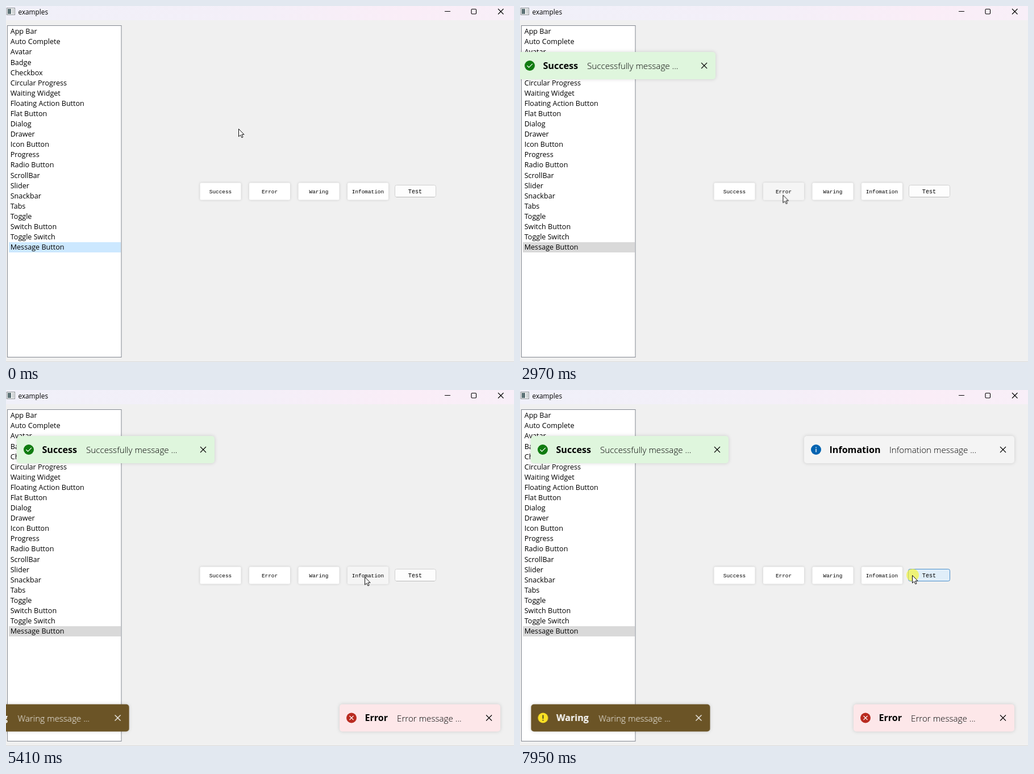
Recreate the animation shown at these times as an HTML page. Size 894 by 627 pixels, loop 7990 ms.

```html
<!DOCTYPE html>
<html lang="en">
<head>
<meta charset="utf-8">
<title>examples</title>
<style>
  html, body { margin: 0; width: 100%; height: 100%; overflow: hidden; background: #f0f0f0; }
  svg { display: block; width: 894px; height: 627px; }
  text { font-family: "Open Sans", "Noto Sans", sans-serif; font-size: 12.6px; fill: #000; }
  .caption { font-size: 11.8px; }
  .label { font: 9.4px "Liberation Mono", monospace; text-anchor: middle; }
  .label.large { font-size: 10.2px; }
  .title { font-size: 16.1px; font-weight: 700; }
  .message { font-size: 15.2px; font-weight: 300; }
  .line { fill: none; stroke: #000; stroke-width: 1.1; }
  .soft { filter: drop-shadow(0 0 2px rgba(0, 0, 0, .17)); }
  .raised { filter: drop-shadow(0 0 3px rgba(0, 0, 0, .15)); }
</style>
</head>
<body>
<svg id="stage" viewBox="0 0 894 627">
  <defs>
    <linearGradient id="bar">
      <stop offset="0" stop-color="#f0f0f9"/>
      <stop offset=".5" stop-color="#f4eff8"/>
      <stop offset=".8" stop-color="#faedf7"/>
      <stop offset="1" stop-color="#f8eff8"/>
    </linearGradient>
  </defs>
  <rect width="894" height="627" fill="#f0f0f0"/>
  <rect width="894" height="25" fill="url(#bar)"/>
  <path d="M0 626.5H894" stroke="#dadada"/>
  <rect x="1.5" y="3.5" width="14" height="12" fill="#f8f8f8" stroke="#8b9094"/>
  <rect x="3" y="5" width="6" height="9" fill="#5c7276"/>
  <rect x="11" y="5" width="3" height="9" fill="#c9ced0"/>
  <text class="caption" x="21.5" y="14.5">examples</text>
  <path class="line" d="M772 9.5H782M866 5L875.5 14.5M875.5 5L866 14.5"/>
  <rect class="line" x="819" y="5.5" width="8.5" height="8.5" rx="1.5"/>
  <rect x="2.5" y="34.5" width="200.5" height="584" fill="#fff" stroke="#828790"/>
  <g id="list"></g>
  <g id="buttons"></g>
  <g id="toasts"></g>
  <g id="cursor">
    <circle id="press" cx="1" cy="0" r="11" fill="#f4f433" fill-opacity=".66"/>
    <path d="M.5 .5V14L3.7 11.1L5.9 15.8L8 14.9L5.9 10.3H10Z" fill="#fff" stroke="#000" stroke-width=".95"/>
  </g>
</svg>
<script>
const LOOP = 7990;
const byId = id => document.getElementById(id);
const css = [];

// stops: [ms, declarations] pairs
function track(id, stops, timing = 'linear') {
  const body = stops.map(([ms, rule]) => `${(ms / LOOP * 100).toFixed(3)}%{${rule}}`).join('');
  css.push(`@keyframes ${id}{${body}}`, `#${id}{animation:${id} ${LOOP}ms ${timing} infinite}`);
}

// visible only within the given [start, end] ranges
function show(id, ...ranges) {
  const stops = ranges.flatMap(([from, to]) => [[from, 'opacity:1'], [to, 'opacity:0']]);
  track(id, [[0, 'opacity:0'], ...stops], 'step-end');
}

const items = ['App Bar', 'Auto Complete', 'Avatar', 'Badge', 'Checkbox', 'Circular Progress',
  'Waiting Widget', 'Floating Action Button', 'Flat Button', 'Dialog', 'Drawer', 'Icon Button',
  'Progress', 'Radio Button', 'ScrollBar', 'Slider', 'Snackbar', 'Tabs', 'Toggle',
  'Switch Button', 'Toggle Switch', 'Message Button'];
byId('list').innerHTML =
  '<rect x="5" y="416" width="197" height="18" fill="#cce8ff"/>' +
  '<rect id="blurred" x="5" y="416" width="197" height="18" fill="#d9d9d9"/>' +
  items.map((name, i) => `<text x="7.7" y="${(49.2 + i * 18.095).toFixed(1)}">${name}</text>`).join('');
show('blurred', [1780, LOOP]);

const buttons = [
  ['Success', 700, 1970], ['Error', 2030, 3695], ['Waring', 3800, 5008], ['Infomation', 5090, 6920]
];
byId('buttons').innerHTML = buttons.map(([name, from, to], i) => {
  const x = 341.5 + i * 86.5;
  const box = `x="${x}" y="311.5" width="72" height="30" rx="2.5"`;
  show('hover' + name, [from, to]);
  return `<rect class="soft" ${box} fill="#fff"/><rect id="hover${name}" ${box} fill="#f5f5f5"/>
    <text class="label" x="${x + 36}" y="330.3">${name}</text>`;
}).join('') + `
  <rect x="684.5" y="315.5" width="72" height="21" rx="3" fill="#fdfdfd" stroke="#d0d0d0"/>
  <path d="M687 336.5H754" stroke="#b9b9b9"/>
  <rect id="hoverTest" x="683.5" y="315.5" width="73" height="21" rx="3" fill="#e0eef9" stroke="#4a8fcb"/>
  <text class="label large" x="720" y="330.3">Test</text>`;
show('hoverTest', [7220, LOOP]);

const icons = {
  check: '<path d="M-4.5 0L-1.5 3.2L4.8 -3.2" fill="none" stroke="#fff" stroke-width="1.2"/>',
  cross: '<path d="M-3.5 -3.5L3.5 3.5M3.5 -3.5L-3.5 3.5" stroke="#fff" stroke-width="1.1"/>',
  alert: '<path d="M0 -5V1.6M0 3.2V5" stroke="#222" stroke-width="1.6"/>',
  info: '<path d="M0 -4.6V-3M0 -1.5V4.6" stroke="#fff" stroke-width="1.4"/>'
};
const toasts = [
  { name: 'Success', text: 'Successfully message ...', icon: 'check', fill: '#dff6dd', dot: '#107c10',
    x: 19, y: 81, width: 348, textX: 122, hidden: -348, start: 1933, time: 1107 },
  { name: 'Error', text: 'Error message ...', icon: 'cross', fill: '#fde7e9', dot: '#b92b20',
    x: 587, y: 553.5, width: 283, textX: 101, hidden: 894, start: 3290, time: 1200 },
  { name: 'Waring', text: 'Waring message ...', icon: 'alert', fill: '#6b5426', dot: '#fce124', ink: '#fff',
    x: 19.5, y: 553.5, width: 315, textX: 119, hidden: -315, start: 4634, time: 1200 },
  { name: 'Infomation', text: 'Infomation message ...', icon: 'info', fill: '#f4f4f4', dot: '#0063b1',
    x: 500, y: 81, width: 370, textX: 150, hidden: 894, start: 6353, time: 1200 }
];
byId('toasts').innerHTML = toasts.map(t => {
  const ink = t.ink || '#000', id = 'toast' + t.name, close = t.width - 20;
  const at = x => `transform:translate(${x}px,${t.y}px)`;
  // parked a little further out so that no shadow shows
  const parked = t.hidden < 0 ? t.hidden - 20 : t.hidden + 20;
  track(id, [[0, at(parked)], [t.start - 1, at(parked)], [t.start, at(t.hidden)],
    [t.start + t.time, at(t.x)], [LOOP, at(t.x)]]);
  return `<g id="${id}">
    <rect class="raised" width="${t.width}" height="48" rx="5" fill="${t.fill}"/>
    <g transform="translate(21 24)"><circle r="9" fill="${t.dot}"/>${icons[t.icon]}</g>
    <text class="title" x="44.5" y="29.8" style="fill:${ink}">${t.name}</text>
    <text class="message" x="${t.textX}" y="30" style="fill:${ink}">${t.text}</text>
    <path class="line" style="stroke:${ink}" transform="translate(${close} 24)" d="M-5 -5L5 5M5 -5L-5 5"/>
  </g>`;
}).join('');

const path = [
  [0, 409, 216], [20, 409, 216], [250, 424, 245], [550, 408, 300], [750, 403, 314], [1060, 402, 313],
  [1610, 396, 318], [1700, 398, 318], [1900, 398, 318], [2200, 466, 327], [2400, 450, 329],
  [2750, 467, 331], [3040, 461, 333], [3400, 461, 333], [3870, 523, 330], [4100, 536, 331],
  [4550, 534, 328], [4700, 534, 328], [5200, 620, 328], [5410, 631, 329], [5800, 640, 331],
  [6450, 643, 331], [6740, 665, 327], [7100, 680, 328], [7330, 688, 328], [7600, 690, 326], [LOOP, 690, 326]
];
track('cursor', path.map(([ms, x, y]) => [ms, `transform:translate(${x}px,${y}px)`]));
show('press', [1780, 1900], [3230, 3350], [4560, 4680], [6280, 6400], [7900, LOOP]);

const sheet = document.createElement('style');
sheet.textContent = css.join('\n');
document.head.append(sheet);
</script>
</body>
</html>
```
